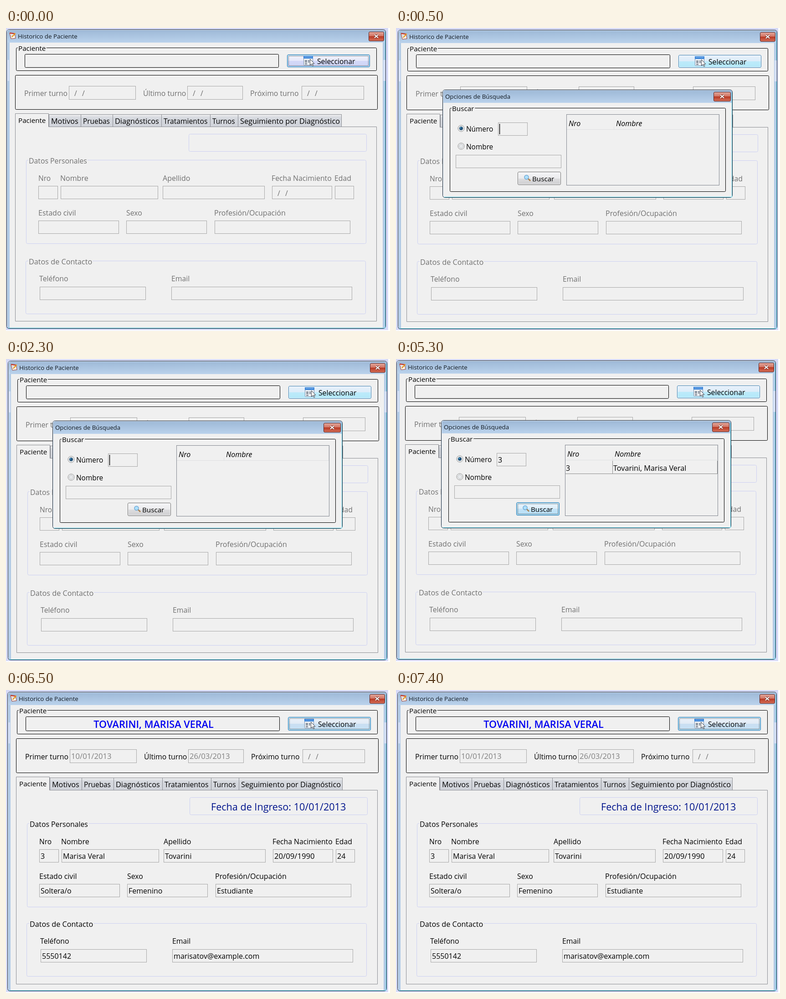
Write an HTML page that moves like this. It is 843 px wide and 664 px high and loops after 8000 ms.

```html
<!DOCTYPE html>
<html lang="es">
<head>
<meta charset="utf-8">
<title>Historico de Paciente</title>
<style>
  html, body { margin: 0; width: 100%; height: 100%; overflow: hidden; background: #fff; }
  svg { display: block; }
  text { font-family: "Open Sans", "Noto Sans", sans-serif; white-space: pre; }
  .legend { paint-order: stroke; stroke: #f0f0f0; stroke-width: 5px; stroke-linejoin: round; }
</style>
</head>
<body>
<svg width="843" height="664" viewBox="0 0 843 664">
  <defs id="defs"></defs>
  <g id="stage"></g>
</svg>
<script>
const FACE = '#f0f0f0', DIM = '#707070', GRAY = '#a8a8a8', EDGE = '#8c8e94', PALE = '#ccd0f2';
const patient = { first: 'Marisa Veral', last: 'Tovarini', phone: '5550142', mail: 'marisatov@example.com' };
const fullName = `${patient.last}, ${patient.first}`;

const gradient = (id, ...stops) =>
  `<linearGradient id="${id}" x2="0" y2="1">${stops.map(([at, color]) =>
    `<stop offset="${at}" stop-color="${color}"/>`).join('')}</linearGradient>`;
const glossy = (id, a, b, c, d) => gradient(id, [0, a], [.5, b], [.5, c], [1, d]);
document.getElementById('defs').innerHTML =
  gradient('title', [0, '#9db8d6'], [1, '#bad2ec']) +
  gradient('tab', [0, '#f0f0f0'], [.25, '#d6d9df'], [1, '#d0d3da']) +
  glossy('close', '#e3a79b', '#d0705f', '#b93a25', '#d4705a') +
  glossy('idle', '#f4f4f6', '#ececee', '#dddddf', '#cfcfd1') +
  glossy('lilac', '#f2f3fb', '#e6e8fa', '#d3d8f8', '#d0d6f6') +
  glossy('hot', '#e8f1fb', '#dcecf9', '#bdeafa', '#b2e8f9') +
  glossy('ready', '#eef3fa', '#e0eaf5', '#cadff2', '#c4e0f4') +
  glossy('pressed', '#e8f3fb', '#dceefa', '#c4e3f7', '#b4def6');

const box = (x1, y1, x2, y2, stroke = GRAY, fill = 'none', r = 0) =>
  `<rect x="${x1 + .5}" y="${y1 + .5}" width="${x2 - x1}" height="${y2 - y1}" rx="${r}" stroke="${stroke}" fill="${fill}"/>`;
const path = (d, stroke, fill = 'none', width = 1) =>
  `<path d="${d}" stroke="${stroke}" fill="${fill}" stroke-width="${width}"/>`;
const text = (x, y, s, fill = '#000', size = 15.8, more = '') =>
  `<text x="${x - 1}" y="${y}" font-size="${size}" fill="${fill}" ${more}>${s}</text>`;
const group = (dx, dy, body) => `<g transform="translate(${dx} ${dy})">${body}</g>`;
const legend = (x, y, s, fill, size) => text(x, y, s, fill, size, 'class="legend"');

const emptyDate = (x, y) => text(x + 13, y, '/', DIM) + text(x + 30, y, '/', DIM);

function field(x1, y1, x2, y2, value = '', fill = '#000', size = 16) {
  return box(x1, y1, x2, y2) + text(x1 + 4, y1 + 21, value, fill, size);
}

function button(x1, y1, x2, y2, look, focused) {
  return box(x1, y1, x2, y2, look === 'idle' ? '#707070' : '#3c7fb1', `url(#${look})`, 2.5) +
    (focused
      ? box(x1 + 1, y1 + 1, x2 - 1, y2 - 1, '#7fcdf0', 'none', 1.5) +
        `<g stroke-dasharray="1 1">${box(x1 + 3, y1 + 3, x2 - 3, y2 - 3, '#333')}</g>`
      : box(x1 + 1, y1 + 1, x2 - 1, y2 - 1, '#ffffffb0', 'none', 1.5));
}

function frame(x1, y1, x2, y2, side, title, titleX, closeWidth) {
  const closeX = x2 - 4 - closeWidth, cx = closeX + closeWidth / 2 + .5, cy = y1 + 15;
  return box(x1, y1, x2, y2, '#1c2633', '#b2cbe6', 5) +
    `<rect x="${x1 + 1}" y="${y1 + 1}" width="${x2 - x1 - 1}" height="28" rx="4" fill="url(#title)"/>` +
    path(`M${x1 + 1.5} ${y2 - 3}V${y1 + 5}q0 -3.5 3.5 -3.5H${x2 - 4}`, '#dbe8f6') +
    path(`M${x2 - .5} ${y1 + 6}V${y2 - .5}H${x1 + 3}`, '#5ed6ee') +
    box(x1 + side, y1 + 29, x2 - side, y2 - 2, FACE, FACE) +
    text(titleX, y1 + 20, title, '#101820', 13.3) +
    box(closeX, y1 + 5, x2 - 4, y1 + 25, '#5b2a2a', 'url(#close)', 2.5) +
    path(`M${cx - 4} ${cy - 3.5}l8 7m0 -7l-8 7`, '#6b2a22', 'none', 4) +
    path(`M${cx - 4} ${cy - 3.5}l8 7m0 -7l-8 7`, '#fff', 'none', 2.3);
}

const notepad =
  path('M8 12l11 1.5l2 10l-10 1z', '#9c3a2c', '#fbfbf6') +
  path('M8 12l11 1.5', '#c0392b', 'none', 2.5) +
  path('M10.5 16.5l6 .5m-5.5 3l4 .3', '#9aa6b5') +
  path('M13 21l7.5 -8.5', '#e69b22', 'none', 2.5);

const formIcon =
  box(653, 61, 673, 81, '#7c93b0', '#eef1f5', 1) +
  `<rect x="653" y="61" width="21" height="6" fill="#3f86d8"/>` +
  path('M655 63.5h17', '#8fc1f4') +
  path('M656 71.5h5m-5 3h5m-5 4h5m2 -7h3m2 0h3m-8 3h3', '#66717f', 'none', 2) +
  path('M667.5 68.5v13l3 -3l2.5 5l2 -1l-2.5 -4.5h4.5z', '#3a3f48', '#fff');

const tabs = [
  [94, 164, 'Motivos', 16.2], [164, 234, 'Pruebas', 15.4], [234, 341, 'Diagnósticos', 16.3],
  [341, 448, 'Tratamientos', 15.7], [448, 509, 'Turnos', 15.4], [509, 736, 'Seguimiento por Diagnóstico', 16.3]
];

function mainWindow(loaded, look, focused) {
  const ink = loaded ? '#000' : DIM, grow = loaded ? 2 : 0;
  const show = value => loaded ? value : '';
  const dated = (x1, y1, x2, y2, value, color) =>
    value ? field(x1, y1, x2, y2, value, color, 16.7)
          : box(x1, y1, x2, y2) + emptyDate(x1, y1 + 22);

  const header =
    box(22, 43, 813, 93 + grow, '#000', 'none', 2) + legend(28, 50, 'Paciente', '#000', 15.2) +
    box(41, 57, 598, 86 + grow, '#000', 'none', 2) +
    text(323, 82, show(fullName.toUpperCase()), '#0000f0', 21.7, 'font-weight="600" text-anchor="middle"') +
    button(617, 58, 798, 85 + grow, look, focused) +
    group(0, grow / 2, formIcon + text(684, 79, 'Seleccionar', '#000', 15.7));

  const visits =
    box(20, 103, 815, 178, '#000', 'none', 2) +
    text(41, 149, 'Primer turno', ink) + dated(138, 127, 284, 156, show('10/01/2013'), '#808080') +
    text(302, 149, 'Último turno', ink) + dated(398, 127, 519, 156, show('26/03/2013'), '#808080') +
    text(537, 149, 'Próximo turno', ink) + dated(649, 127, 785, 156);

  const tabStrip =
    tabs.map(([x1, x2, label, size]) =>
      box(x1, 189, x2, 216, EDGE, 'url(#tab)') + text(x1 + 6, 210, label, '#000', size)).join('') +
    path(`M93.5 216.5H813.5V${642.5 - grow / 2}H20.5V187.5H93.5Z`, EDGE, FACE) +
    text(28, 208, 'Paciente', '#000', 15.2);

  const personal =
    box(401, 232, 791, 270, PALE, 'none', 3) +
    text(449, 261, show('Fecha de Ingreso: 10/01/2013'), '#00148c', 21.6) +
    box(44, 289, 790, 472, PALE, 'none', 3) + legend(51, 297, 'Datos Personales', ink) +
    text(72, 335, 'Nro', ink, 15.5) + field(71, 346, 113, 374, show('3')) +
    text(120, 335, 'Nombre', ink, 16) + field(120, 346, 333, 374, show(patient.first)) +
    text(345, 335, 'Apellido', ink, 16) + field(344, 346, 567, 374, show(patient.last)) +
    text(584, 335, 'Fecha Nacimiento', ink) + dated(584, 346, 715, 374, show('20/09/1990'), '#000') +
    text(722, 335, 'Edad', ink) + field(722, 346, 763, 374, show('24')) +
    text(72, 411, 'Estado civil', ink, 16) + field(71, 422, 247, 450, show('Soltera/o')) +
    text(265, 411, 'Sexo', ink) + field(264, 422, 440, 450, show('Femenino')) +
    text(458, 411, 'Profesión/Ocupación', ink, 16) + field(458, 422, 755, 450, show('Estudiante'));

  const contact =
    box(43, 510, 789, 626, PALE, 'none', 3) + legend(51, 518, 'Datos de Contacto', ink, 16.2) +
    text(74, 555, 'Teléfono', ink) + field(74, 567, 306, 595, show(patient.phone)) +
    text(364, 555, 'Email', ink) + field(363, 567, 759, 595, show(patient.mail));

  return frame(1, 3, 833, 658, 7, 'Historico de Paciente', 27, 33) + group(0, -1, notepad) +
    '<path d="M2 70h5v46h-5zM828 70h5v46h-5z" fill="#d4dff5"/>' +
    header + group(0, grow, visits + tabStrip + personal) + contact;
}

function radio(y, label, on) {
  return `<circle cx="140" cy="${y}" r="7" fill="#f6f6f6" stroke="#8e8f8f"/>` +
    `<circle cx="140" cy="${y}" r="4.6" fill="${on ? '#a8c8de' : '#e6e8ea'}" stroke="#b4b8bc"/>` +
    (on ? `<circle cx="140" cy="${y}" r="3.6" fill="#17486f"/><circle cx="139" cy="${y - 1}" r="1.3" fill="#58b4e4"/>` : '') +
    text(152, y + 7, label, '#000', 15.4);
}

function searchDialog(found) {
  const italic = 'font-style="italic"';
  return frame(99, 134, 735, 370, 2, 'Opciones de Búsqueda', 106, 37) +
    box(115, 174, 720, 357, '#000', 'none', 2) + legend(121, 181, 'Buscar', '#000', 15.2) +
    radio(219, 'Número', true) + radio(258, 'Nombre', false) +
    field(221, 206, 285, 234, found ? '3' : '') +
    (found ? '' : path('M224.5 209V232', '#000', 'none', 1.5)) +
    field(128, 277, 359, 305) +
    button(264, 314, 358, 342, found ? 'pressed' : 'idle', found) +
    path('M287 329l5 5', '#a77f4c', 'none', 2.5) +
    '<circle cx="283.5" cy="326" r="4.5" fill="#aee0fa" stroke="#6da7d6" stroke-width="1.5"/>' +
    text(297, 335, 'Buscar', '#000', 15.2) +
    box(371, 188, 706, 343, '#828790') +
    path('M372 221.5H705.5V190M475.5 215V222', '#dedfe1') +
    text(377, 214, 'Nro', '#000', 16, italic) + text(481, 214, 'Nombre', '#000', 16, italic) +
    (found
      ? path('M372 251.5H705.5V223M475.5 223V251', '#8c8c8c') +
        text(374, 245, '3', '#000', 16) + text(478, 245, fullName, '#000', 16.2)
      : '');
}

// Each scene: start in ms, window offset, content
const scenes = [
  [0, 0, 0, () => mainWindow(false, 'lilac', true)],
  [500, 3, 1, () => mainWindow(false, 'hot', false) + searchDialog(false)],
  [3500, 0, 0, () => mainWindow(false, 'hot', false) + searchDialog(true)],
  [6500, 2, 1, () => mainWindow(true, 'ready', true)]
];
const stage = document.getElementById('stage');
let current;

function tick() {
  const time = performance.now() % 8000;
  const scene = scenes.findLast(([start]) => time >= start);
  if (scene !== current) {
    current = scene;
    const [, dx, dy, draw] = scene;
    stage.innerHTML = '<rect width="839" height="662" fill="#d6daf8"/>' + group(dx, dy, draw());
  }
  requestAnimationFrame(tick);
}
tick();
</script>
</body>
</html>
```
